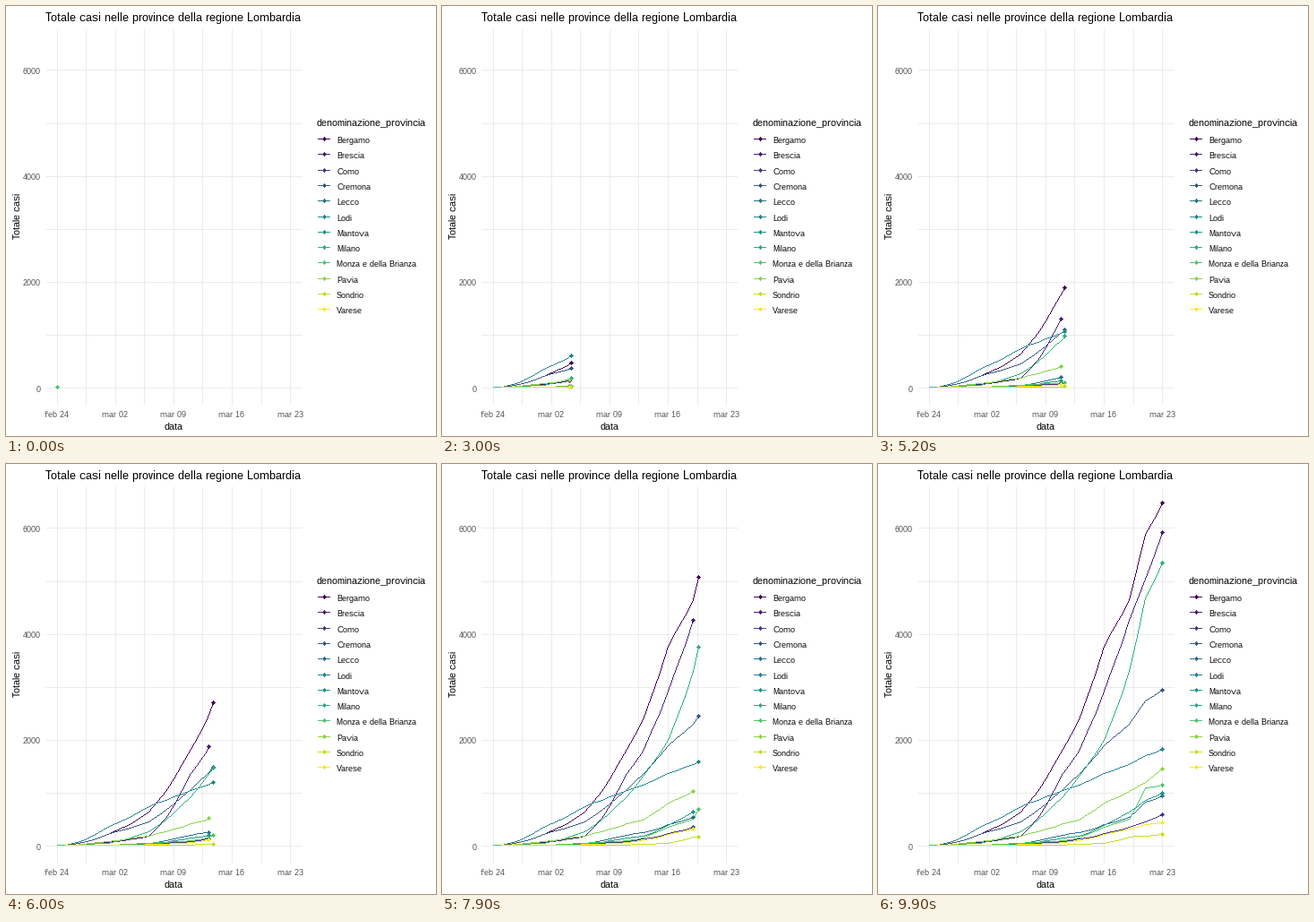
A matplotlib script that plays this animation: 480 by 480 pixels, repeating every 10 s.

```python
import numpy as np
import matplotlib.pyplot as plt
from matplotlib.animation import FuncAnimation

plt.rcParams.update({
    "font.family": "Liberation Sans",
    "text.hinting": "native",
    "text.hinting_factor": 1,
})

SIZE, DPI = 480, 80
PX = 72 / DPI  # points per pixel
FRAMES, INTERVAL = 100, 100
LAST_DAY = 28
DAYS = np.arange(LAST_DAY + 1)
GRID, TICK = "#EBEBEB", "#4D4D4D"

# Key points of each curve; all start from zero
KEY_DAYS = [0, 6, 11, 16, 18, 21, 24, 26, 28]
CASES = {
    "Bergamo": [209, 623, 1815, 2368, 3760, 4645, 5869, 6471],
    "Brescia": [49, 182, 1351, 1784, 2918, 4247, 5028, 5905],
    "Como": [2, 23, 77, 118, 220, 338, 452, 581],
    "Cremona": [214, 452, 1061, 1344, 1881, 2286, 2733, 2925],
    "Lecco": [2, 35, 199, 237, 386, 530, 818, 934],
    "Lodi": [344, 739, 1035, 1133, 1362, 1528, 1693, 1817],
    "Mantova": [1, 26, 137, 169, 382, 636, 842, 985],
    "Milano": [46, 267, 925, 1307, 1983, 3278, 4672, 5326],
    "Monza e della Brianza": [6, 40, 85, 143, 346, 495, 1084, 1130],
    "Pavia": [78, 180, 403, 482, 801, 1011, 1194, 1444],
    "Sondrio": [3, 5, 13, 23, 46, 155, 177, 205],
    "Varese": [0, 20, 50, 98, 202, 310, 386, 421],
}
SLOW = {"Brescia", "Como", "Lecco", "Mantova", "Pavia", "Varese"}
LATE = {"Pavia", "Sondrio", "Varese"}  # no data on the first day

fig = plt.figure(figsize=(SIZE / DPI, SIZE / DPI), dpi=DPI, facecolor="white")
ax = fig.add_axes([0, 0, 1, 1])
ax.set_xlim(0, SIZE)
ax.set_ylim(SIZE, 0)
ax.axis("off")


def sx(day):
    return 56.9 + 9.29 * np.asarray(day)


def sy(cases):
    return 426.3 - 0.05915 * np.asarray(cases)


def growth(keys):
    """Daily cases, growing quadratically between key points."""
    return np.interp(DAYS, KEY_DAYS, np.sqrt([0, *keys])) ** 2


def text(x, y, s, size, color="black", ha="left", **kw):
    ax.text(x, y, s, fontsize=size * PX, color=color, ha=ha, va="baseline", **kw)


def rule(x, y):
    ax.plot(x, y, color=GRID, lw=PX, solid_capstyle="butt", zorder=1)


def snap(v):
    return np.floor(np.asarray(v) + 0.5)


def trace(xs, ys):
    """Pixels of a one pixel wide polyline."""
    pts = np.column_stack([snap(xs), snap(ys)])
    parts = [pts[:1]]
    for a, b in zip(pts, pts[1:]):
        n = int(max(1, np.abs(b - a).max()))
        t = np.linspace(0, 1, n + 1)[:, None]
        parts.append(snap(a + (b - a) * t))
    return np.vstack(parts)


def disc(x, y, r=2):
    """Pixels of a small filled circle."""
    dy, dx = np.mgrid[-r:r + 1, -r:r + 1]
    inside = dx ** 2 + dy ** 2 <= r ** 2
    return np.column_stack([snap(x) + dx[inside], snap(y) + dy[inside]])


def paint(artist, pts):
    artist.set_data(pts[:, 0] + 0.25, pts[:, 1] + 0.25)


def ink(color, z):
    return ax.plot([], [], ",", color=color, zorder=z)[0]


# Grid and axes
for v in range(0, 7000, 1000):
    rule([44, 330], [sy(v)] * 2)
    if v % 2000 == 0:
        text(39, sy(v) + 4.4, str(v), 9, TICK, "right")
for week, label in enumerate(["feb 24", "mar 02", "mar 09", "mar 16", "mar 23"]):
    x = sx(7 * week)
    rule([x, x], [25, 445])
    text(x, 459, label, 9, TICK, "center")
    if week < 4:
        rule([sx(7 * week + 3.5)] * 2, [25, 445])

text(43.5, 17, "Totale casi nelle province della regione Lombardia", 13)
text(187, 473, "data", 11, ha="center")
text(16, 235, "Totale casi", 11, ha="center", rotation=90, rotation_mode="anchor")
text(347, 134, "denominazione_provincia", 11)

# Legend and curves
series = []
colors = plt.cm.viridis(np.linspace(0, 1, len(CASES)))
for i, (name, keys) in enumerate(CASES.items()):
    y = 149.2 + 17.28 * i
    key = ink(colors[i], 2)
    paint(key, np.vstack([trace([348, 361], [y, y]), disc(355, y)]))
    text(369, y + 4, name, 9)

    pace = 3.29 if name in SLOW else 3.2  # frames per day
    start = 1 if name in LATE else 0
    line, dot = ink(colors[i], 4 + i / 100), ink(colors[i], 5 + i / 100)
    series.append((growth(keys), pace, start, line, dot))


def update(frame):
    artists = []
    for curve, pace, start, line, dot in series:
        day = min(LAST_DAY, frame / pace)
        shown = day >= start
        line.set_visible(shown)
        dot.set_visible(shown)
        if shown:
            days = np.append(DAYS[(DAYS >= start) & (DAYS < day)], day)
            xs, ys = sx(days), sy(np.interp(days, DAYS, curve))
            paint(line, trace(xs, ys))
            paint(dot, disc(xs[-1], ys[-1]))
        artists += [line, dot]
    return artists


anim = FuncAnimation(fig, update, frames=FRAMES, interval=INTERVAL, repeat=True,
                     repeat_delay=0, blit=False)
plt.show()
```
